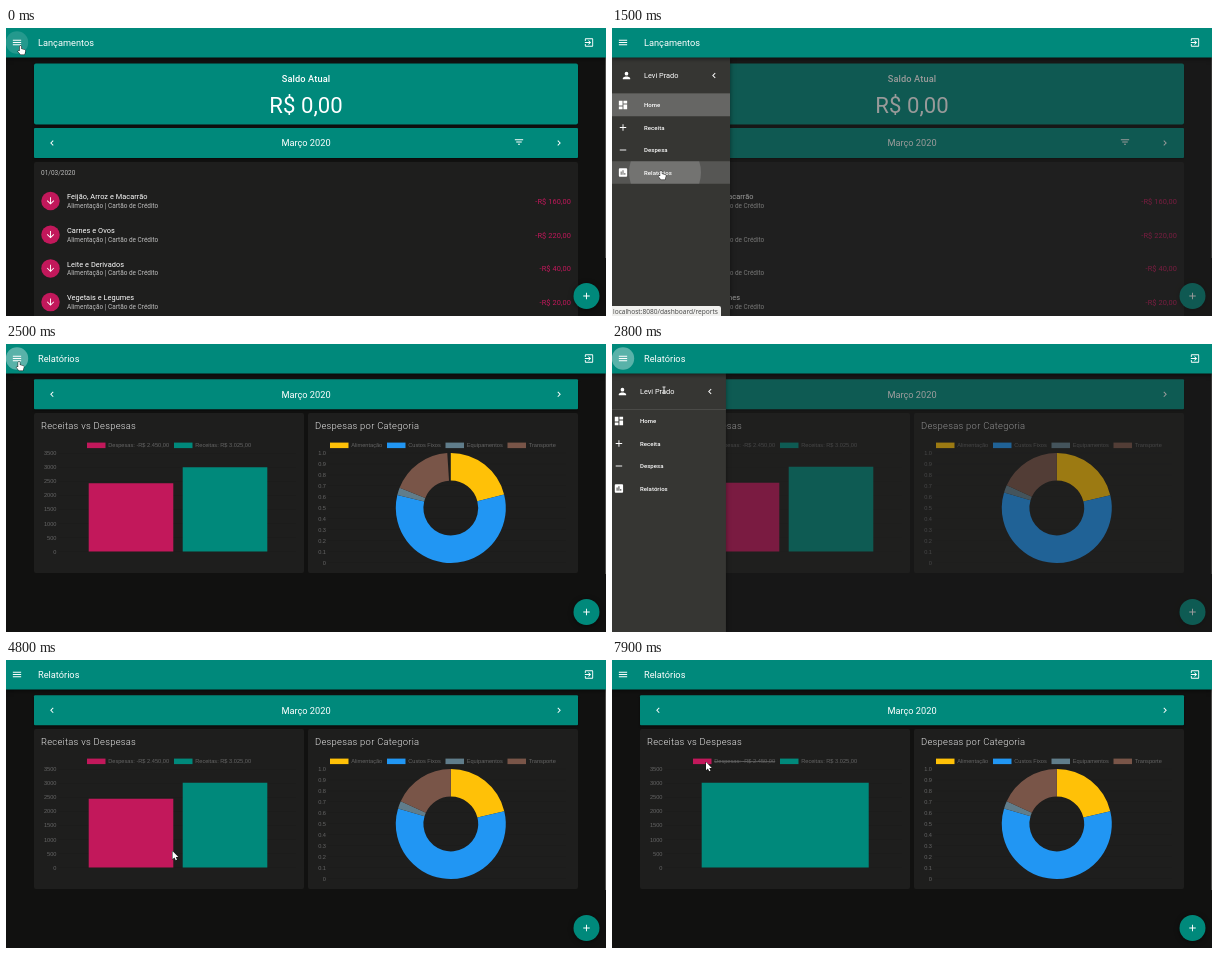
An HTML page with a canvas that plays this animation: 600 px wide and 288 px high, repeating every 8000 ms.

```html
<!DOCTYPE html>
<html lang="pt-BR">
<head>
<meta charset="utf-8">
<title>Relatórios</title>
<style>
  html, body { margin: 0; width: 600px; height: 288px; overflow: hidden; background: #111110; }
  canvas { display: block; }
</style>
</head>
<body>
<canvas id="stage" width="600" height="288"></canvas>
<script>
const ctx = document.getElementById('stage').getContext('2d');
const LOOP = 8000, STEP = 100;
const TEAL = '#00897b', PINK = '#c2185b', CARD = '#1e1e1d', GREY = '#666';
const UI = 'Roboto, sans-serif', CHART = '"Liberation Sans", Arial, sans-serif';
const white = a => `rgba(255,255,255,${a})`;

const ICONS = {
  menu: 'M3 18h18v-2H3zm0-5h18v-2H3zm0-7v2h18V6z',
  exit: 'M10.09 15.59L11.5 17l5-5-5-5-1.41 1.41L12.67 11H3v2h9.67zM19 3H5a2 2 0 0 0-2 2v4h2V5h14v14H5v-4H3v4a2 2 0 0 0 2 2h14a2 2 0 0 0 2-2V5a2 2 0 0 0-2-2z',
  left: 'M15.41 7.41L14 6l-6 6 6 6 1.41-1.41L10.83 12z',
  right: 'M10 6L8.59 7.41 13.17 12l-4.58 4.59L10 18l6-6z',
  filter: 'M10 18h4v-2h-4zM3 6v2h18V6zm3 7h12v-2H6z',
  plus: 'M19 13h-6v6h-2v-6H5v-2h6V5h2v6h6z',
  minus: 'M19 13H5v-2h14z',
  down: 'M11 4h2v12l5.5-5.5 1.42 1.42L12 19.84l-7.92-7.92L5.5 10.5 11 16z',
  person: 'M12 12a4 4 0 1 0 0-8 4 4 0 0 0 0 8zm0 2c-2.67 0-8 1.34-8 4v2h16v-2c0-2.66-5.33-4-8-4z',
  board: 'M3 13h8V3H3zm0 8h8v-6H3zm10 0h8V11h-8zm0-18v6h8V3z',
  report: 'M19 3H5a2 2 0 0 0-2 2v14a2 2 0 0 0 2 2h14a2 2 0 0 0 2-2V5a2 2 0 0 0-2-2zM9 17H7v-7h2zm4 0h-2V7h2zm4 0h-2v-4h2z'
};
const POINTER = new Path2D('M0 0V8.2L1.9 6.5 3.2 9.3 4.5 8.7 3.3 6H5.8Z');
const HAND = new Path2D('M-.8 .2Q0-.6.8.2V3L4.2 3.8Q5 4.2 4.8 5.2L4 8.6H0L-2.6 5.2Q-2.4 4.2-.8 5Z');
const BEAM = new Path2D('M-1.5-3H1.5M0-3V3M-1.5 3H1.5');

const clamp = v => Math.max(0, Math.min(1, v));
const mix = (a, b, p) => a + (b - a) * p;
const span = (t, start, length) => clamp((t - start) / length);
const outQuart = p => 1 - (1 - p) ** 4;
const slide = p => 1 - (1 - p ** 1.6) ** 2.8;

function rect(x, y, w, h, color, radius = 0) {
  ctx.fillStyle = color;
  ctx.beginPath();
  ctx.roundRect(x, y, w, h, radius);
  ctx.fill();
}
function circle(x, y, r, color) {
  ctx.fillStyle = color;
  ctx.beginPath();
  ctx.arc(x, y, r, 0, 7);
  ctx.fill();
}
function text(s, x, y, size, { color = '#fff', align = 'left', weight = 400, family = UI, spacing = 0 } = {}) {
  ctx.font = `${weight} ${size}px ${family}`;
  ctx.letterSpacing = spacing + 'px';
  ctx.textAlign = align;
  ctx.fillStyle = color;
  ctx.fillText(s, x, y);
}
const chartText = (s, x, y, color = GREY, align = 'left') =>
  text(s, x, y, 5.65, { color, align, family: CHART });
function icon(name, x, y, size = 11.08) {
  ctx.save();
  ctx.translate(x - size / 2, y - size / 2);
  ctx.scale(size / 24, size / 24);
  ctx.fillStyle = '#fff';
  ctx.fill(new Path2D(ICONS[name]), 'evenodd');
  ctx.restore();
}
function withShadow(blur, draw) {
  ctx.save();
  ctx.shadowColor = 'rgba(0,0,0,.5)';
  ctx.shadowBlur = blur;
  ctx.shadowOffsetY = 1;
  draw();
  ctx.restore();
}

function monthBar(y) {
  withShadow(2, () => rect(28, y, 544, 30, TEAL, 1));
  text('Março 2020', 300, y + 18.3, 9.23, { align: 'center' });
  icon('left', 46, y + 15);
  icon('right', 553, y + 15);
}

const ENTRIES = [['Feijão, Arroz e Macarrão', 160], ['Carnes e Ovos', 220], ['Leite e Derivados', 40], ['Vegetais e Legumes', 20]];

function homePage() {
  withShadow(2, () => rect(28, 35.5, 544, 61, TEAL, 2));
  text('Saldo Atual', 300, 53.5, 9.23, { align: 'center', weight: 500, spacing: .115 });
  text('R$ 0,00', 300, 85, 22.15, { align: 'center' });
  monthBar(100);
  icon('filter', 513, 114);
  rect(28, 134, 544, 160, CARD, 2);
  text('01/03/2020', 35, 147.3, 6.46, { color: white(.7) });
  ENTRIES.forEach(([name, value], i) => {
    const y = 173 + i * 33.7;
    circle(44.5, y, 9.23, PINK);
    icon('down', 44.5, y);
    text(name, 61, y - 1.8, 7.38, { spacing: .04 });
    text('Alimentação | Cartão de Crédito', 61, y + 7, 6.46, { color: white(.7) });
    text(`-R$ ${value},00`, 565, y + 2.8, 7.38, { color: PINK, align: 'right', spacing: .1 });
  });
}

const SERIES = [
  { label: 'Despesas: -R$ 2.450,00', value: 2450, color: PINK, hover: '#c5004d', key: 81, x: 125 },
  { label: 'Receitas: R$ 3.025,00', value: 3025, color: TEAL, hover: '#00796b', key: 168, x: 219 }
];
const SLICES = [
  ['Alimentação', '#ffc107', 324, 76.5], ['Custos Fixos', '#2196f3', 381, 286.5],
  ['Equipamentos', '#607d8b', 439.5, 294.5], ['Transporte', '#795548', 501.5, 360]
];
const BASE = 207.6, barTop = v => BASE - v * 98.3 / 3500;

function axis(x, right, y, gap, labels) {
  labels.forEach((label, i) => {
    rect(x + 2, y + i * gap - .25, right - x - 2, .5, 'rgba(0,0,0,.12)');
    chartText(label, x, y + i * gap + 2, GREY, 'right');
  });
}
function legend(label, color, x) {
  rect(x, 98.6, 18.5, 5.5, color);
  chartText(label, x + 21.2, 103.3);
}

function tooltip(t) {
  const alpha = outQuart(span(t, 4920, 400)) * (1 - outQuart(span(t, 6550, 350)));
  if (!alpha) return;
  const second = t >= 6200, move = outQuart(span(t, 6150, 400));
  const { label, color } = SERIES[+second];
  const x = mix(127.3, 148, move), y = mix(barTop(2450), barTop(3025), move);
  const w = second ? 68.7 : 73.3;
  ctx.save();
  ctx.globalAlpha = alpha;
  rect(x, y - 5.6, w, 11.2, 'rgba(0,0,0,.8)', 2.8);
  const edge = second ? x + w : x, tip = second ? 2.3 : -2.3;
  ctx.beginPath();
  ctx.moveTo(edge, y - 2.3);
  ctx.lineTo(edge + tip, y);
  ctx.lineTo(edge, y + 2.3);
  ctx.fill();
  rect(x + 2.8, y - 2.8, 5.5, 5.5, '#fff');
  rect(x + 3.3, y - 2.3, 4.5, 4.5, color);
  chartText(label, x + 9.2, y + 2, '#fff');
  ctx.restore();
}

function barChart(t) {
  axis(50.5, 290, 109.3, 14.04, [3500, 3000, 2500, 2000, 1500, 1000, 500, 0]);
  const grow = outQuart(span(t, 1784, 1000));
  const hidden = t >= 7300, widen = outQuart(span(t, 7300, 1000));
  const hover = outQuart(span(t, 4920, 400)) * (1 - outQuart(span(t, 6550, 300)));
  SERIES.forEach((s, i) => {
    legend(s.label, s.color, s.key);
    if (hidden && !i) return rect(102.2, 100.9, 61, .8, GREY);
    const x = mix(s.x, 172, widen), w = mix(84.6, 169.2, widen);
    const y = barTop(s.value * grow);
    rect(x - w / 2, y, w, BASE - y, s.color);
    ctx.globalAlpha = hover;
    rect(x - w / 2, y, w, BASE - y, s.hover);
    ctx.globalAlpha = 1;
  });
  tooltip(t);
}

function doughnut(t) {
  axis(320, 560, 109, 10.95, ['1.0', .9, .8, .7, .6, .5, .4, .3, .2, .1, 0]);
  const turn = outQuart(span(t, 1818, 1000)) * Math.PI / 180;
  let from = 0;
  for (const [label, color, x, to] of SLICES) {
    legend(label, color, x);
    const a = from * turn - Math.PI / 2, b = to * turn - Math.PI / 2;
    ctx.fillStyle = color;
    ctx.beginPath();
    ctx.arc(444.8, 164, 55, a, b);
    ctx.arc(444.8, 164, 27.4, b, a, true);
    ctx.fill();
    from = to;
  }
}

function reportsPage(t) {
  monthBar(35.3);
  const title = { color: white(.9), weight: 300, spacing: .28 };
  rect(28, 69, 270, 160, CARD, 2);
  rect(302, 69, 270, 160, CARD, 2);
  text('Receitas vs Despesas', 35, 85, 9.4, title);
  text('Despesas por Categoria', 309, 85, 9.4, title);
  barChart(t);
  doughnut(t);
}

const MENU = [['board', 'Home'], ['plus', 'Receita'], ['minus', 'Despesa'], ['report', 'Relatórios']];

function drawer(t, open, hovered) {
  if (!open) return;
  rect(0, 0, 600, 288, `rgba(33,33,33,${.46 * open})`);
  ctx.save();
  ctx.translate(-118 * (1 - open), 0);
  withShadow(5, () => rect(0, 29, 118, 259, '#363633'));
  icon('person', 14.5, 47.5);
  text('Levi Prado', 32, 50.2, 7.38);
  icon('left', 102, 47.5);
  rect(0, 65.5, 118, .5, white(.2));
  MENU.forEach(([name, label], i) => {
    const y = 77 + i * 22.5;
    if (!i && t < 1900) rect(0, y - 11.2, 118, 22.5, white(.24));
    else if (i === hovered) rect(0, y - 11.2, 118, 22.5, white(i === 3 ? .16 : .08));
    if (i === 3 && t >= 1400 && t < 1900) {
      ctx.save();
      ctx.beginPath();
      ctx.rect(0, y - 11.2, 118, 22.5);
      ctx.clip();
      circle(53, y, mix(10, 62, span(t, 1400, 200)), white(.17 * (1 - span(t, 1550, 300))));
      ctx.restore();
    }
    icon(name, 11, y);
    text(label, 32, y + 2.2, 6, { weight: 500, spacing: .06 });
  });
  ctx.restore();
}

function header(t, title, overMenu) {
  withShadow(4, () => rect(0, 0, 600, 29.5, TEAL));
  const ripple = Math.max(
    span(t, 200, 100) * (1 - span(t, 500, 400)),
    span(t, 2400, 100) * (1 - span(t, 2800, 400))) * .35;
  circle(11, 14.5, 11.2, white(Math.max(ripple, overMenu ? .14 : 0)));
  icon('menu', 11, 14.5);
  text(title, 32, 17.7, 9.23);
  icon('exit', 583, 14.5);
}

// Pointer path: time, x, y
const PATH = [
  [0, 14.5, 18], [900, 14.5, 18], [1400, 49, 143], [1600, 49, 143], [1900, 22.5, 58.5],
  [2300, 13, 18], [2600, 13, 18], [2800, 52, 46], [3100, 50, 95], [3600, 60, 112],
  [4100, 272, 235], [4400, 272, 235], [4800, 166.5, 191], [5100, 140, 172], [5900, 140, 172],
  [6400, 209.5, 163.5], [6600, 208, 120], [6800, 204, 114], [6900, 175, 96], [7100, 94, 102], [LOOP, 94, 102]
];
function pointerAt(t) {
  const i = PATH.findIndex(k => k[0] > t), [t0, x0, y0] = PATH[i - 1], [t1, x1, y1] = PATH[i];
  const p = (t - t0) / (t1 - t0);
  return [mix(x0, x1, p), mix(y0, y1, p)];
}
function cursor(x, y, shape) {
  ctx.save();
  ctx.translate(x, y);
  ctx.lineWidth = 1;
  ctx.strokeStyle = shape === BEAM ? '#ddd' : '#111';
  ctx.stroke(shape);
  ctx.fillStyle = '#fff';
  if (shape !== BEAM) ctx.fill(shape);
  ctx.restore();
}

function draw(t) {
  const home = t < 1900;
  const open = slide(span(t, home ? 400 : 2640, 200)) * (1 - slide(span(t, home ? 1600 : 4300, 200)));
  const [x, y] = pointerAt(t);
  const overMenu = x < 22 && y < 29;
  const row = Math.floor((y - 65.8) / 22.5);
  const hovered = open > .5 && x < 118 && row >= 0 && row < 4 ? row : -1;

  rect(0, 0, 600, 288, '#111110');
  if (home) homePage(); else reportsPage(t);
  rect(599, 29, 1, 201, '#4a4a48');
  withShadow(5, () => circle(580.5, 268, 13, TEAL));
  icon('plus', 580.5, 268);
  drawer(t, open, hovered);
  header(t, home ? 'Lançamentos' : 'Relatórios', overMenu);
  if (hovered === 3) {
    rect(0, 278, 109, 10, '#f0f0ee', [0, 2, 0, 0]);
    text('localhost:8080/dashboard/reports', 1, 285.6, 6.6, { color: '#444', family: '"Open Sans", sans-serif' });
  }
  const overName = open > .5 && x > 30 && x < 75 && y > 42 && y < 53;
  cursor(x, y, overName ? BEAM : overMenu || hovered >= 0 ? HAND : POINTER);
}

function tick() {
  draw(Math.floor(performance.now() % LOOP / STEP) * STEP);
  requestAnimationFrame(tick);
}
tick();
</script>
</body>
</html>
```
